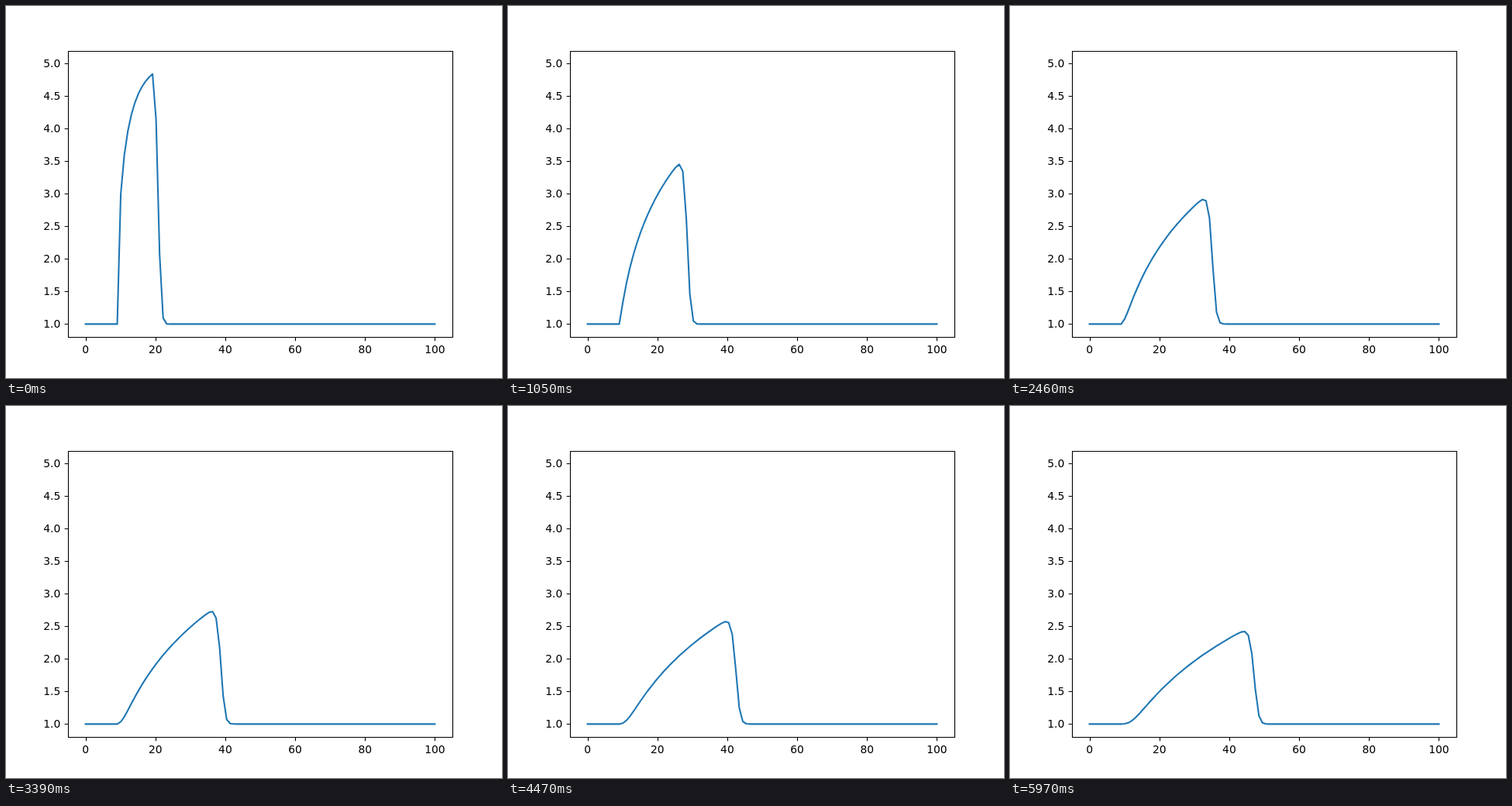
An HTML page that plays this animation: 640x480 px, repeating every 6000 ms.

```html
<!DOCTYPE html>
<html lang="en">
<head>
<meta charset="utf-8">
<title>Steepening wave</title>
<style>
  html, body { margin: 0; width: 100%; height: 100%; overflow: hidden; background: #fff; }
  svg { display: block; width: 640px; height: 480px; }
  text { font: 13.889px "DejaVu Sans", sans-serif; fill: #000; }
  .axes { fill: none; stroke: #000; stroke-width: 1.11; }
  .wave { fill: none; stroke: #1f77b4; stroke-width: 2.083; stroke-linejoin: round; stroke-linecap: square; }
</style>
</head>
<body>
<svg viewBox="0 0 640 480">
  <path class="wave" id="wave"/>
  <path class="axes" id="axes"/>
  <g id="labels"></g>
</svg>
<script>
const FRAME_MS = 30, FRAMES = 200, WARMUP = 4;
const POINTS = 100, COURANT = 0.025;
const BOX = { left: 80, right: 576, top: 57.6, bottom: 427.2 };
const TICK = 4.86;

const byId = id => document.getElementById(id);
const toX = x => 102.545 + x * 4.50909;
const toY = u => BOX.bottom - (u - 0.8) * 84;
const snap = v => Math.floor(v + 0.5) + 0.5;

function addLabel(text, x, y, anchor) {
  const node = document.createElementNS("http://www.w3.org/2000/svg", "text");
  node.setAttribute("x", x);
  node.setAttribute("y", y);
  node.setAttribute("text-anchor", anchor);
  node.textContent = text;
  byId("labels").append(node);
}

function drawAxes() {
  const [l, r, t, b] = [BOX.left, BOX.right, BOX.top, BOX.bottom].map(snap);
  let d = `M${l} ${t}H${r}V${b}H${l}Z`;
  for (let x = 0; x <= 100; x += 20) {
    d += `M${snap(toX(x))} ${b}v${TICK}`;
    addLabel(x, toX(x), 448, "middle");
  }
  for (let u = 1; u <= 5; u += 0.5) {
    d += `M${l} ${snap(toY(u))}h${-TICK}`;
    addLabel(u.toFixed(1), 70.3, Math.floor(toY(u)) + 5, "end");
  }
  byId("axes").setAttribute("d", d);
}

// Upwind advection with speed = (mean u)^2, updated in place from left to right.
function advance(u) {
  for (let i = 1; i < POINTS; i++) {
    const mean = (u[i] + u[i - 1]) / 2;
    u[i] -= COURANT * mean * mean * (u[i] - u[i - 1]);
  }
}

const toPath = u => "M" + Array.from(u, (v, i) =>
  toX(i * 100 / (POINTS - 1)).toFixed(2) + " " + toY(v).toFixed(2)).join("L");

function simulate() {
  const u = new Float64Array(POINTS).fill(1).fill(5, 10, 20);
  for (let i = 1; i < WARMUP; i++) advance(u);
  return Array.from({ length: FRAMES }, () => {
    advance(u);
    return toPath(u);
  });
}

drawAxes();
const paths = simulate();
const start = performance.now();

function render(now) {
  const frame = Math.floor(Math.max(0, now - start) / FRAME_MS) % FRAMES;
  byId("wave").setAttribute("d", paths[frame]);
  requestAnimationFrame(render);
}
render(start);
</script>
</body>
</html>
```
